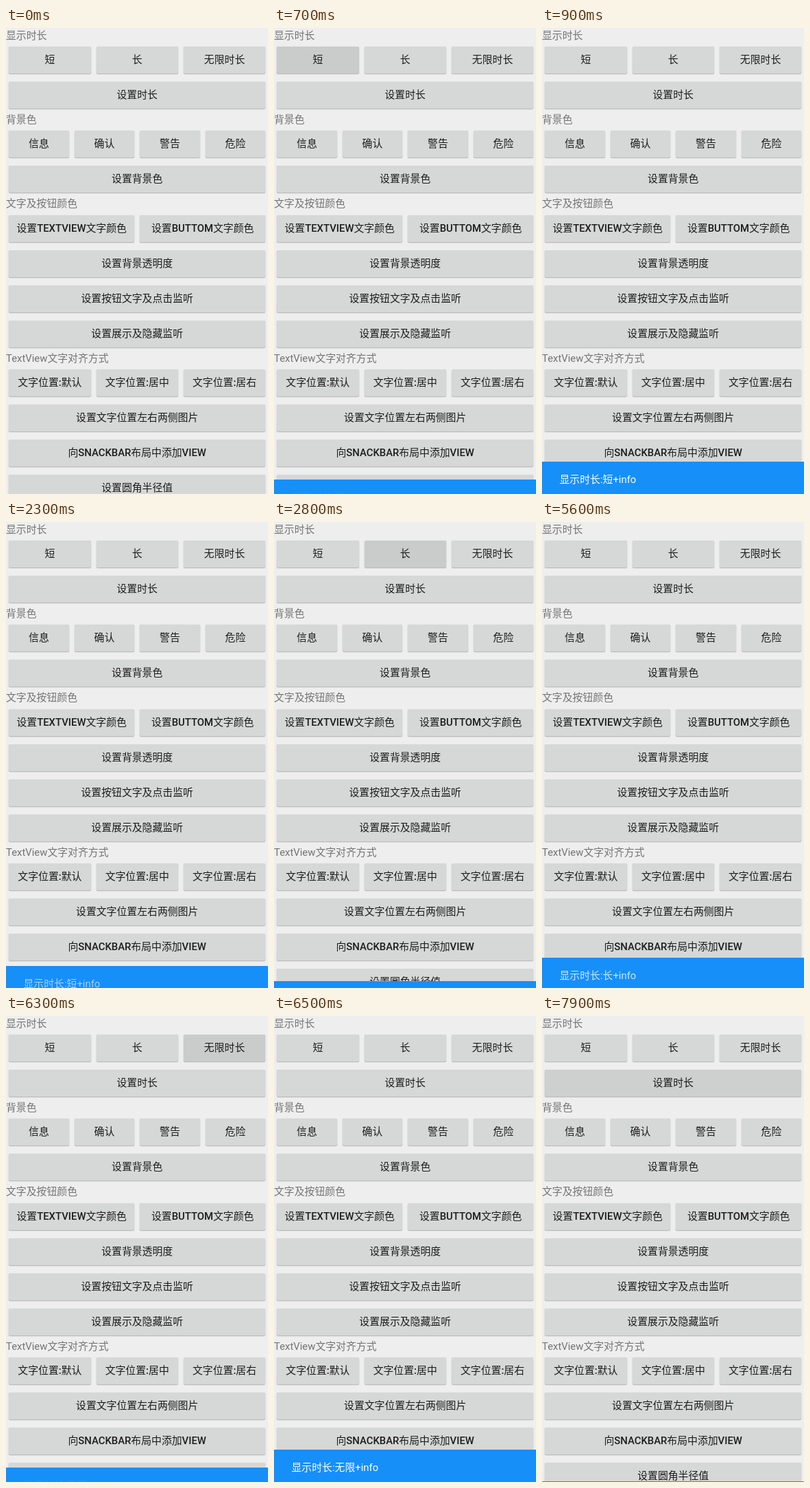
Write an HTML page that moves like this. It is 382 px wide and 677 px high and loops after 8000 ms.

```html
<!DOCTYPE html>
<html lang="zh-CN">
<head>
<meta charset="utf-8">
<title>Snackbar</title>
<style>
  html, body { margin: 0; width: 100%; height: 100%; overflow: hidden; background: #eee; }
  #stage {
    position: relative; width: 382px; height: 677px; overflow: hidden;
    background: #eee; white-space: nowrap;
    font: 14.86px/20px Roboto, "Noto Sans CJK SC", "Noto Sans CJK", sans-serif;
  }
  #stage div { position: absolute; }
  .label { left: 0; color: #747474; }
  .button {
    height: 39px; line-height: 39px; border-radius: 2px; text-align: center;
    background: #d6d7d7; color: #1c1c1c; font-weight: 500;
    box-shadow: 0 1px 1.5px rgba(0, 0, 0, .26), 0 0 1px rgba(0, 0, 0, .1);
  }
  .shade { inset: 0; border-radius: 2px; background: #000; opacity: 0; }
  #bar { left: 0; top: 630px; width: 382px; height: 47px; background: #168ff9; }
  #message { left: 25.5px; top: 16px; color: #fff; }
</style>
</head>
<body>
<div id="stage"></div>
<script>
const WIDTH = 382, LOOP = 8000, STEP = 100, BAR = 47, SLIDE = 250, FADE = 180;
const stage = document.getElementById('stage');

const labels = [
  [11, '显示时长'], [133, '背景色'], [255, '文字及按钮颜色'], [480, 'TextView文字对齐方式']
];

// Centre line of each row, then its equally wide buttons.
const rows = [
  [46, '短', '长', '无限时长'],
  [97, '设置时长'],
  [168, '信息', '确认', '警告', '危险'],
  [219, '设置背景色'],
  [291, '设置TEXTVIEW文字颜色', '设置BUTTOM文字颜色'],
  [342, '设置背景透明度'],
  [393, '设置按钮文字及点击监听'],
  [444, '设置展示及隐藏监听'],
  [515, '文字位置:默认', '文字位置:居中', '文字位置:居右'],
  [566, '设置文字位置左右两侧图片'],
  [617, '向SNACKBAR布局中添加VIEW'],
  [668, '设置圆角半径值']
];

// Slide-in start, slide-out start, time gone, message.
const snacks = [
  { show: 618, hide: 2230, gone: 2400, text: '显示时长:短+info' },
  { show: 2740, hide: 5562, gone: 5800, text: '显示时长:长+info' },
  { show: 6218, hide: 7696, gone: 8000, text: '显示时长:无限+info' }
];

// Shade opacity for each step after the touch.
const presses = [
  { button: '短', at: 500, shades: [.02, .05, .055, .03] },
  { button: '长', at: 2700, shades: [.03, .055, .04] },
  { button: '无限时长', at: 6100, shades: [.02, .05, .055, .03] },
  { button: '设置时长', at: 7700, shades: [.015, .03, .035] }
];

function add(parent, className, text = '') {
  const el = document.createElement('div');
  el.className = className;
  el.textContent = text;
  parent.append(el);
  return el;
}

for (const [y, text] of labels) add(stage, 'label', text).style.top = y - 10 + 'px';

const shades = {};
for (const [y, ...names] of rows) {
  const cell = WIDTH / names.length;
  names.forEach((name, i) => {
    const button = add(stage, 'button', name);
    button.style.left = i * cell + 4.2 + 'px';
    button.style.width = cell - 8 + 'px';
    button.style.top = y - 19.5 + 'px';
    shades[name] = add(button, 'shade');
  });
}

const bar = add(stage, '');
bar.id = 'bar';
const message = add(bar, '');
message.id = 'message';

const clamp = x => Math.min(1, Math.max(0, x));

// cubic-bezier(.4, 0, .2, 1)
function ease(x) {
  if (x <= 0 || x >= 1) return clamp(x);
  let low = 0, high = 1, s;
  for (let i = 0; i < 24; i++) {
    s = (low + high) / 2;
    const r = 1 - s;
    if (1.2 * r * r * s + .6 * r * s * s + s ** 3 < x) low = s; else high = s;
  }
  return s * s * (3 - 2 * s);
}

function draw(t) {
  const snack = snacks.find(s => t >= s.show && t < s.gone);
  bar.style.visibility = snack ? 'visible' : 'hidden';
  if (snack) {
    const leaving = t >= snack.hide;
    const age = t - (leaving ? snack.hide : snack.show);
    const moved = ease(age / SLIDE);
    const y = BAR * (leaving ? moved : 1 - moved);
    bar.style.transform = `translateY(${Math.round(y)}px)`;
    message.style.opacity = leaving ? clamp(1 - age / FADE) : clamp((age - 70) / FADE);
    if (message.textContent !== snack.text) message.textContent = snack.text;
  }
  for (const p of presses) {
    shades[p.button].style.opacity = p.shades[Math.floor((t - p.at) / STEP)] || 0;
  }
}

const start = performance.now();
function tick() {
  const t = (performance.now() - start) % LOOP;
  draw(Math.floor(t / STEP) * STEP);
  requestAnimationFrame(tick);
}
tick();
</script>
</body>
</html>
```
